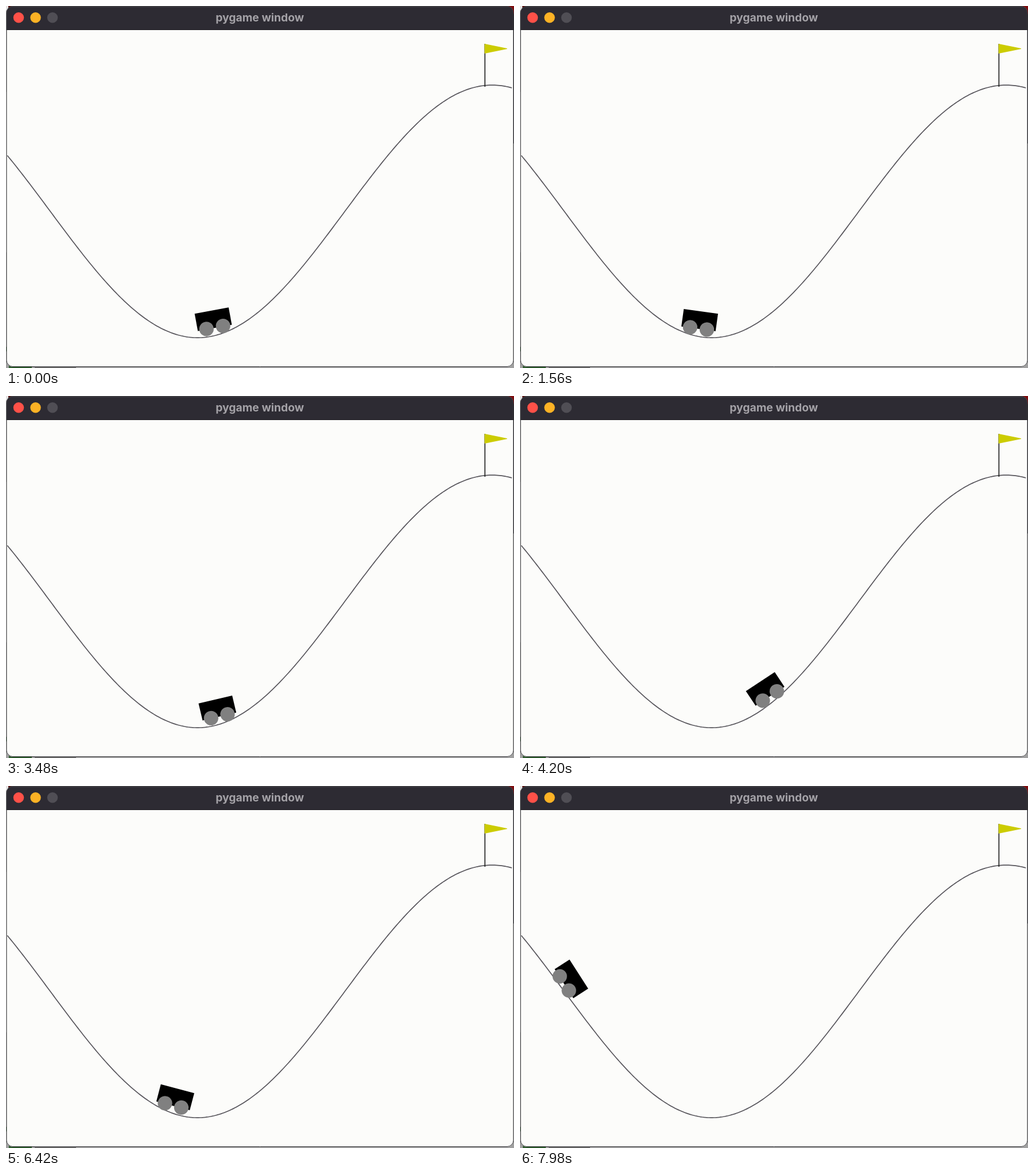
An HTML page with a canvas for the animation above (8000 ms loop, 885x632 px).

```html
<!DOCTYPE html>
<html lang="en">
<head>
<meta charset="utf-8">
<title>Mountain car</title>
<style>
  html, body { margin: 0; width: 100%; height: 100%; overflow: hidden; background: #777; }
  canvas { display: block; }
</style>
</head>
<body>
<canvas id="stage" width="885" height="632"></canvas>
<script>
const ctx = document.getElementById('stage').getContext('2d');
const LOOP = 8000;
const PX = 1.47;            // window pixels per simulation pixel
const UNIT = 490;           // window pixels per unit of track
const LEFT = 2, BASE = 628.5;

// Car passes: time in ms, x in px, velocity in px/s
const KEYS = [
  [0, 363.5, -5], [1560, 310.8, -38], [2030, 300.5, 0], [2780, 321.2, 55],
  [4200, 435, 78], [4700, 455, 0], [5440, 421, -92], [6420, 291, -191], [7980, 77, -65]
];
// The picture stalls briefly before each of these times
const BURSTS = [0, 1660, 2540, 3340, 4200, 5040, 5860, 6700, 7540, 8100];
const STEP = 40, STALL = 100;

function steppedTime(t) {
  const i = BURSTS.findIndex((start, n) => t >= start && t < BURSTS[n + 1]);
  const inBurst = Math.min(t, BURSTS[i + 1] - STALL) - BURSTS[i];
  return BURSTS[i] + Math.floor(inBurst / STEP) * STEP;
}

function carX(t) {
  let i = 0;
  while (i < KEYS.length - 2 && t >= KEYS[i + 1][0]) i++;
  const [t0, x0, v0] = KEYS[i], [t1, x1, v1] = KEYS[i + 1];
  const s = Math.min(1, (t - t0) / (t1 - t0)), sec = (t1 - t0) / 1000;
  const s2 = s * s, s3 = s2 * s;
  return x0 + (x1 - x0) * (3 * s2 - 2 * s3)
    + sec * (v0 * (s3 - 2 * s2 + s) + v1 * (s3 - s2));
}

const position = x => (x - LEFT) / UNIT - 1.2;
const trackY = x => BASE - UNIT * (0.55 + 0.45 * Math.sin(3 * position(x)));

function rect(color, x, y, w, h) {
  ctx.fillStyle = color;
  ctx.fillRect(x, y, w, h);
}

function disc(color, x, y, r) {
  ctx.fillStyle = color;
  ctx.beginPath();
  ctx.arc(x, y, r, 0, 2 * Math.PI);
  ctx.fill();
}

function drawDesktop() {
  rect('#a0a0a0', 0, 0, 885, 632);
  rect('#e4e4e4', 0, 0, 4, 8);
  rect('#5a1212', 4, 0, 10, 3);
  rect('#7c0d10', 865, 0, 20, 14);
  rect('#1d1d20', 884, 14, 1, 226);
  rect('#c4c4c4', 0, 150, 1, 280);
  rect('#2c5a2c', 0, 595, 1, 8);
  rect('#2c5a2c', 5, 628, 40, 4);
  rect('#333', 50, 631, 72, 1);
}

function drawWindow() {
  ctx.save();
  ctx.beginPath();
  ctx.roundRect(1, 0.5, 883, 629.5, 11);
  ctx.clip();
  rect('#fcfcfa', 0, 0, 885, 632);
  rect('#2d2b33', 0, 0, 885, 42);
  rect('#56545b', 0, 0, 885, 1.5);
  rect('#1c1b20', 0, 41, 885, 1);
  ctx.restore();

  disc('#ff5148', 22, 20.3, 9.2);
  disc('#fdb225', 51.5, 20.3, 9.2);
  disc('#504e55', 81, 20.3, 9.2);

  ctx.fillStyle = '#a3a1a6';
  ctx.font = '700 19.3px Inter, sans-serif';
  ctx.textAlign = 'center';
  ctx.fillText('pygame window', 442.2, 26.5);
}

function drawTrack() {
  ctx.save();
  ctx.translate(0.3, -0.4);
  ctx.strokeStyle = '#57555b';
  ctx.lineWidth = 1.7;
  ctx.beginPath();
  for (let x = LEFT; x <= 883; x += 3) ctx.lineTo(x, trackY(x));
  ctx.stroke();
  ctx.restore();
}

function drawFlag() {
  const x = 834, top = 66;
  rect('#222', x - 0.5, top, 1.7, 75);
  ctx.fillStyle = '#cccc00';
  ctx.beginPath();
  ctx.moveTo(x - 0.3, top);
  ctx.lineTo(x - 0.3, top + 16.9);
  ctx.lineTo(x + 39, top + 8.9);
  ctx.lineTo(x + 39, top + 7.9);
  ctx.fill();
}

function drawCar(x) {
  const edge = 0.7;         // the body is outlined in its own colour
  ctx.save();
  ctx.translate(x + 0.2, trackY(x) - 10 * PX + 0.2);
  ctx.rotate(-Math.cos(3 * position(x)));
  rect('#000', -20 * PX - edge, -20 * PX - edge, 40 * PX + 2 * edge, 20 * PX + 2 * edge);
  for (const side of [-1, 1]) disc('#808080', side * 10 * PX, 0, 12.6);
  ctx.restore();
}

function drawBorder() {
  ctx.strokeStyle = '#3a3a3e';
  ctx.lineWidth = 1;
  ctx.beginPath();
  ctx.roundRect(1, 0.5, 883, 629, 11);
  ctx.stroke();
}

function draw(t) {
  drawDesktop();
  drawWindow();
  drawTrack();
  drawCar(carX(steppedTime(t)));
  drawFlag();
  drawBorder();
}

const begin = performance.now();
function tick() {
  draw((performance.now() - begin) % LOOP);
  requestAnimationFrame(tick);
}
tick();
</script>
</body>
</html>
```
